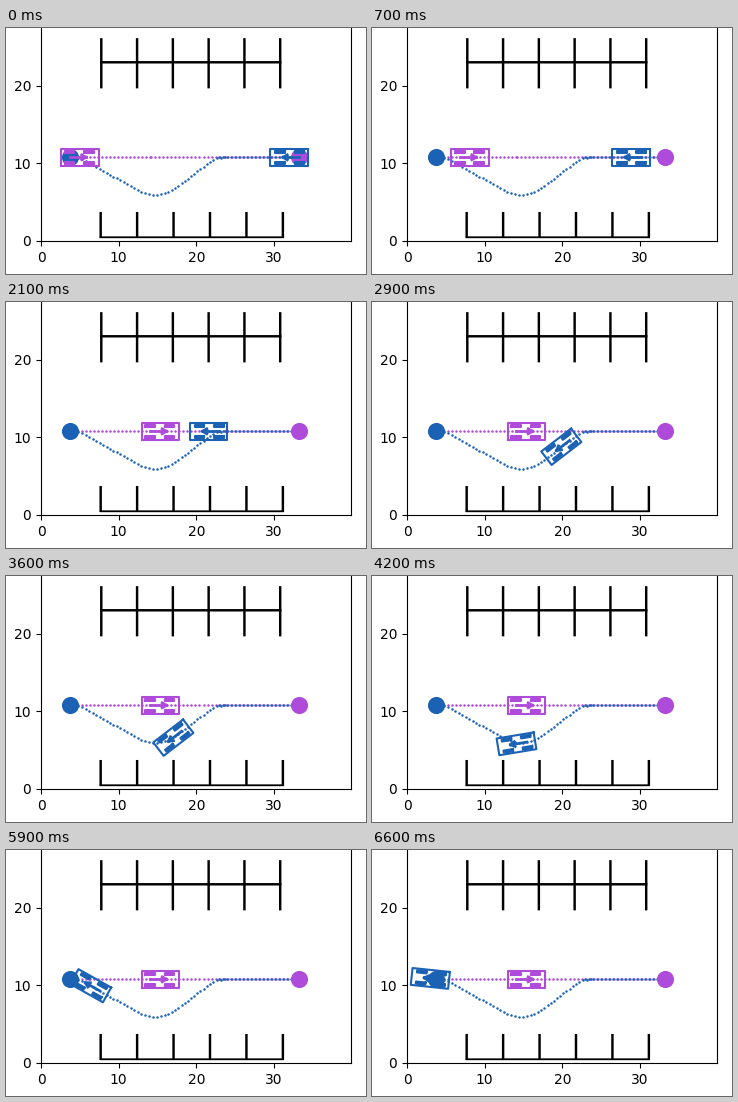
Write a matplotlib script that moves like this. It is 360 by 246 pixels and loops after 8 s.

```python
import numpy as np
import matplotlib.pyplot as plt
from matplotlib.animation import FuncAnimation

W, H, DPI = 360, 246, 100
SCALE = 7.77                      # pixels per data unit
BLUE, PURPLE = "#1b62b5", "#ae4bdb"

# Lane, drive speed and car dimensions in data units
LEFT, RIGHT, LANE = 3.68, 33.25, 10.77
STEP, CURVE_STEP = 0.518, 0.51
DRIVE_STEPS, CURVE_STEPS, REPLAN = 20, 43, 23
REAR, FRONT, HALF_W, BASE = 1.09, 3.74, 1.09, 2.5
TIRE_L, TIRE_W, TRACK = 0.62, 0.14, 0.73
ARROW = 2.1


def detour():
    """Blue car's evasive path: heading is piecewise linear in arc length."""
    ds = CURVE_STEP / 50
    s = np.arange(CURVE_STEPS * 50 + 1) * ds
    bend = np.interp(s, [0, 2.32, 7.46, 12.75, 20.37, 21.92],
                     [0, 37.5, 37.5, -29.3, -29.3, -6])
    yaw = np.pi + np.radians(bend)
    mid = (yaw[1:] + yaw[:-1]) / 2
    x = 23.66 + np.r_[0, np.cumsum(np.cos(mid))] * ds
    y = LANE + np.r_[0, np.cumsum(np.sin(mid))] * ds
    return np.column_stack([x, y, yaw])[::50]


def rect(x0, x1, y0, y1):
    return np.array([[x0, y0], [x1, y0], [x1, y1], [x0, y1], [x0, y0]])


BODY = rect(-REAR, FRONT, -HALF_W, HALF_W)
TIRES = [rect(cx - TIRE_L, cx + TIRE_L, cy - TIRE_W, cy + TIRE_W)
         for cx in (0, BASE) for cy in (-TRACK, TRACK)]
BARB = 0.3 * ARROW * np.array([np.cos(np.pi / 6), np.sin(np.pi / 6)])
SHAFT = np.array([[0, 0], [ARROW, 0]])
BARBS = [np.array([[ARROW, 0], [ARROW - BARB[0], side * BARB[1]]])
         for side in (-1, 1)]


class Car:
    def __init__(self, ax, color, z):
        self.parts = []
        for shape in [BODY] + TIRES:
            line, = ax.plot([], [], color=color, lw=1.5, zorder=z)
            self.parts.append((line, shape))
        self.fills = [(ax.fill([0, 0, 0], [0, 0, 0], color=color, lw=0,
                               zorder=z)[0], shape) for shape in TIRES]
        for shape in [SHAFT] + BARBS:
            line, = ax.plot([], [], color=color, lw=2, zorder=z)
            self.parts.append((line, shape))

    def place(self, x, y, yaw):
        c, s = np.cos(yaw), np.sin(yaw)
        turn = np.array([[c, s], [-s, c]])
        for line, shape in self.parts:
            line.set_data(*(shape @ turn + (x, y)).T)
        for patch, shape in self.fills:
            patch.set_xy(shape @ turn + (x, y))


def dots(ax, x, y, color):
    ax.plot(x, y, "o", color=color, ms=1.8, mew=0, zorder=2)


def parking(ax, x0, gap, bottom, top, wall, wall_lw):
    xs = x0 + gap * np.arange(6)
    for x in xs:
        ax.plot([x, x], [bottom, top], color="black", lw=1.75, snap=False)
    ax.plot([xs[0], xs[-1]], [wall, wall], color="black", lw=wall_lw,
            snap=False)


fig = plt.figure(figsize=(W / DPI, H / DPI), dpi=DPI, facecolor="white")
# The axes run past the top edge of the stage
ax = fig.add_axes([35 / W, 33 / H, 310 / W, 310 / H])
ax.set_xlim(0, 310 / SCALE)
ax.set_ylim(0, 310 / SCALE)
ax.set_xticks([0, 10, 20, 30])
ax.set_yticks([0, 10, 20])

parking(ax, 7.76, 4.605, 19.8, 25.95, 23.0, 1.75)
parking(ax, 7.68, 4.69, 0.55, 3.58, 0.48, 1.3)

path = detour()
first = np.arange(DRIVE_STEPS + 1) * STEP
rest = np.arange(14.18, RIGHT, STEP)
dots(ax, LEFT + first, LANE + 0 * first, PURPLE)
dots(ax, rest, LANE + 0 * rest, PURPLE)
dots(ax, RIGHT - first, LANE + 0 * first, BLUE)
dots(ax, path[:, 0], path[:, 1], BLUE)
for x, color in ((LEFT, BLUE), (RIGHT, PURPLE)):
    ax.plot(x, LANE, "o", color=color, ms=11.3, zorder=3)

purple = Car(ax, PURPLE, 4)
blue = Car(ax, BLUE, 5)


def update(n):
    run = STEP * np.clip(n - 1, 0, DRIVE_STEPS)
    purple.place(LEFT + run, LANE, 0)
    if n < REPLAN:
        blue.place(RIGHT - run, LANE, np.pi)
    else:
        blue.place(*path[min(n - REPLAN, CURVE_STEPS)])
    return []


anim = FuncAnimation(fig, update, frames=80, interval=100, repeat=True,
                     repeat_delay=0, init_func=lambda: update(0))
plt.show()
```
